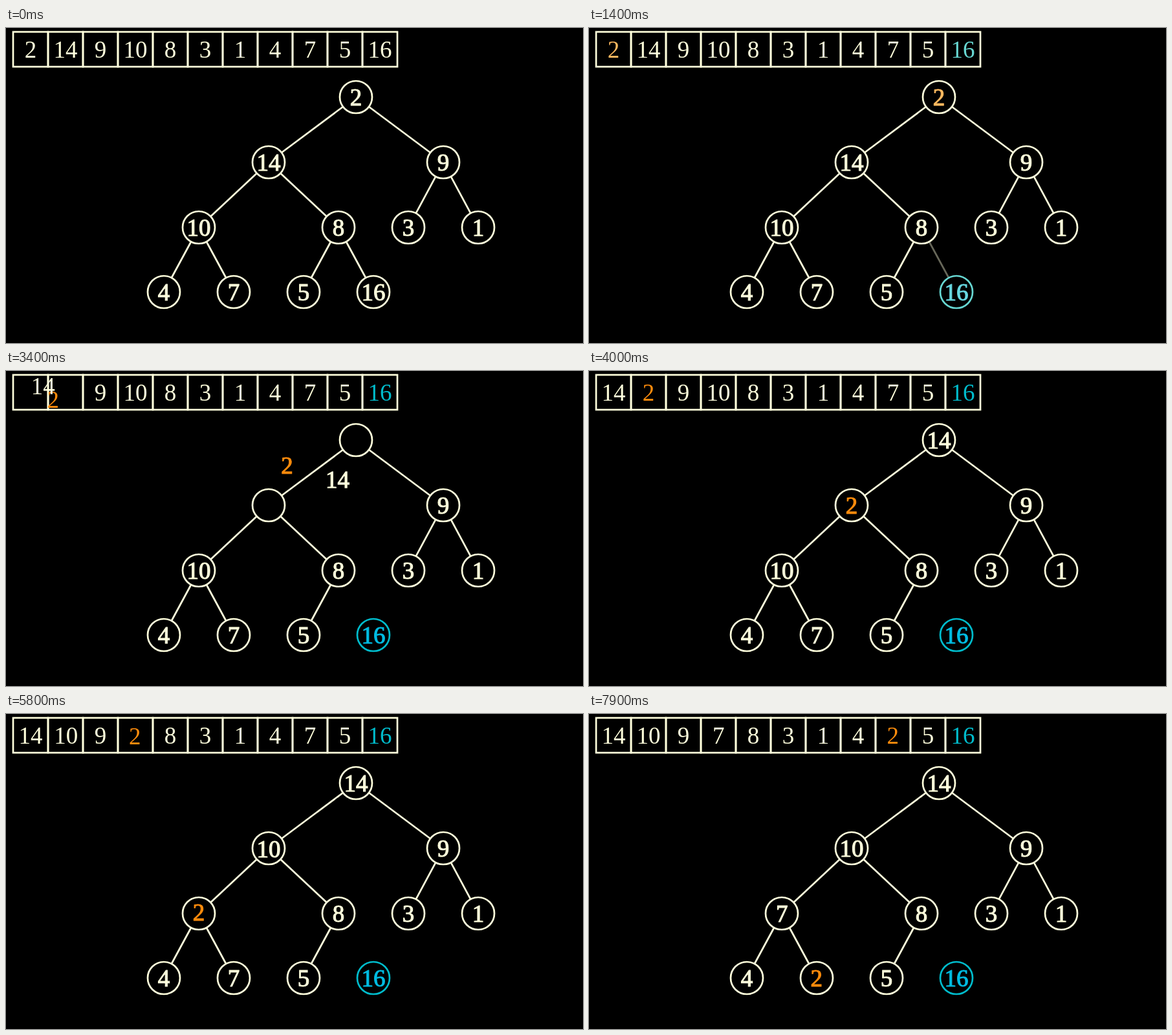
Recreate the animation shown at these times as an HTML page. Size 892x488 px, loop 8000 ms.

```html
<!DOCTYPE html>
<html lang="en">
<head>
<meta charset="utf-8">
<title>Heap sift-down</title>
<style>
  html, body { margin: 0; width: 100%; height: 100%; overflow: hidden; background: #000; }
  svg { display: block; width: 892px; height: 488px; }
  .line { fill: none; stroke: #ffffdc; stroke-width: 2.7; }
  text { font: 37px "Liberation Serif", "Times New Roman", serif; text-anchor: middle; fill: #ffffdc; }
  .bold { stroke: #ffffdc; stroke-width: 1.1; }
</style>
</head>
<body>
<svg id="stage" viewBox="0 0 892 488"></svg>
<script>
const LOOP = 8000, RUN = 1050, MARK_AT = 835;
const SWAPS = [[2820, 0, 1], [4833, 1, 3], [6869, 3, 8]];
const VALUES = [2, 14, 9, 10, 8, 3, 1, 4, 7, 5, 16];
const LAST = VALUES.length - 1;
const NODES = [[541, 107], [406, 208], [676, 208], [298, 309], [514, 309], [622, 309],
  [730, 309], [244, 409], [352, 409], [460, 409], [568, 409]];
const CELLS = VALUES.map((_, i) => [38 + 54 * i, 33.5]);
const CREAM = [255, 255, 220], ORANGE = [255, 140, 12], BLUE = [0, 188, 226], TEAL = [0, 188, 204];
const RADIUS = 25;

const stage = document.getElementById("stage");

function add(tag, attrs) {
  const el = document.createElementNS("http://www.w3.org/2000/svg", tag);
  for (const key in attrs) el.setAttribute(key, attrs[key]);
  return stage.appendChild(el);
}

function addLabel(value, cls) {
  const el = add("text", { class: cls });
  el.textContent = value;
  return el;
}

// Edge between a node and its parent, trimmed at both circles
function addEdge(i) {
  const [x1, y1] = NODES[(i - 1) >> 1], [x2, y2] = NODES[i];
  const k = RADIUS / Math.hypot(x2 - x1, y2 - y1);
  const dx = (x2 - x1) * k, dy = (y2 - y1) * k;
  return add("line", { class: "line", x1: x1 + dx, y1: y1 + dy, x2: x2 - dx, y2: y2 - dy });
}

CELLS.forEach(([x]) => add("rect", { class: "line", x: x - 27, y: 6, width: 54, height: 54 }));
const edges = VALUES.map((_, i) => i && addEdge(i));
const rings = NODES.map(([cx, cy]) => add("circle", { class: "line", cx, cy, r: RADIUS }));
const cellLabels = VALUES.map(v => addLabel(v, ""));
const nodeLabels = VALUES.map(v => addLabel(v, "bold"));

const sigmoid = x => 1 / (1 + Math.exp(-x));

function smooth(t) {
  if (t <= 0) return 0;
  if (t >= 1) return 1;
  const edge = sigmoid(-5);
  return (sigmoid(10 * (t - 0.5)) - edge) / (1 - 2 * edge);
}

const mix = (a, b, s) => `rgb(${a.map((v, i) => Math.round(v + (b[i] - v) * s))})`;

// Counterclockwise quarter-circle path from a to b
function arc([ax, ay], [bx, by], s) {
  const dx = (bx - ax) / 2, dy = (by - ay) / 2;
  const cx = ax + dx + dy, cy = ay + dy - dx;
  const x = ax - cx, y = ay - cy;
  const cos = Math.cos(s * Math.PI / 2), sin = Math.sin(s * Math.PI / 2);
  return [cx + x * cos + y * sin, cy - x * sin + y * cos];
}

// For each label: the slot it leaves, the slot it heads for, and its progress
function routes(time) {
  const order = VALUES.map((_, i) => i);
  const moves = order.map(i => [i, i, 0]);
  for (const [start, i, j] of SWAPS) {
    if (time < start) break;
    const s = smooth((time - start) / RUN);
    const a = order[i], b = order[j];
    moves[a] = [i, j, s];
    moves[b] = [j, i, s];
    order[i] = b;
    order[j] = a;
  }
  return moves;
}

function place(el, slots, [from, to, s]) {
  const [x, y] = from === to ? slots[from] : arc(slots[from], slots[to], s);
  el.setAttribute("x", x);
  el.setAttribute("y", y + 12.7);
}

function paint(el, color) {
  el.style.fill = color;
  if (el.classList.contains("bold")) el.style.stroke = color;
}

function draw(now) {
  const time = now % LOOP;
  routes(time).forEach((move, i) => {
    place(cellLabels[i], CELLS, move);
    place(nodeLabels[i], NODES, move);
  });
  const s = smooth((time - MARK_AT) / RUN);
  paint(cellLabels[0], mix(CREAM, ORANGE, s));
  paint(nodeLabels[0], mix(CREAM, ORANGE, s));
  paint(cellLabels[LAST], mix(CREAM, TEAL, s));
  paint(nodeLabels[LAST], mix(CREAM, BLUE, s));
  rings[LAST].style.stroke = mix(CREAM, TEAL, s);
  edges[LAST].style.opacity = 1 - s;
}

const begin = performance.now();
function tick() {
  draw(performance.now() - begin);
  requestAnimationFrame(tick);
}
tick();
</script>
</body>
</html>
```
